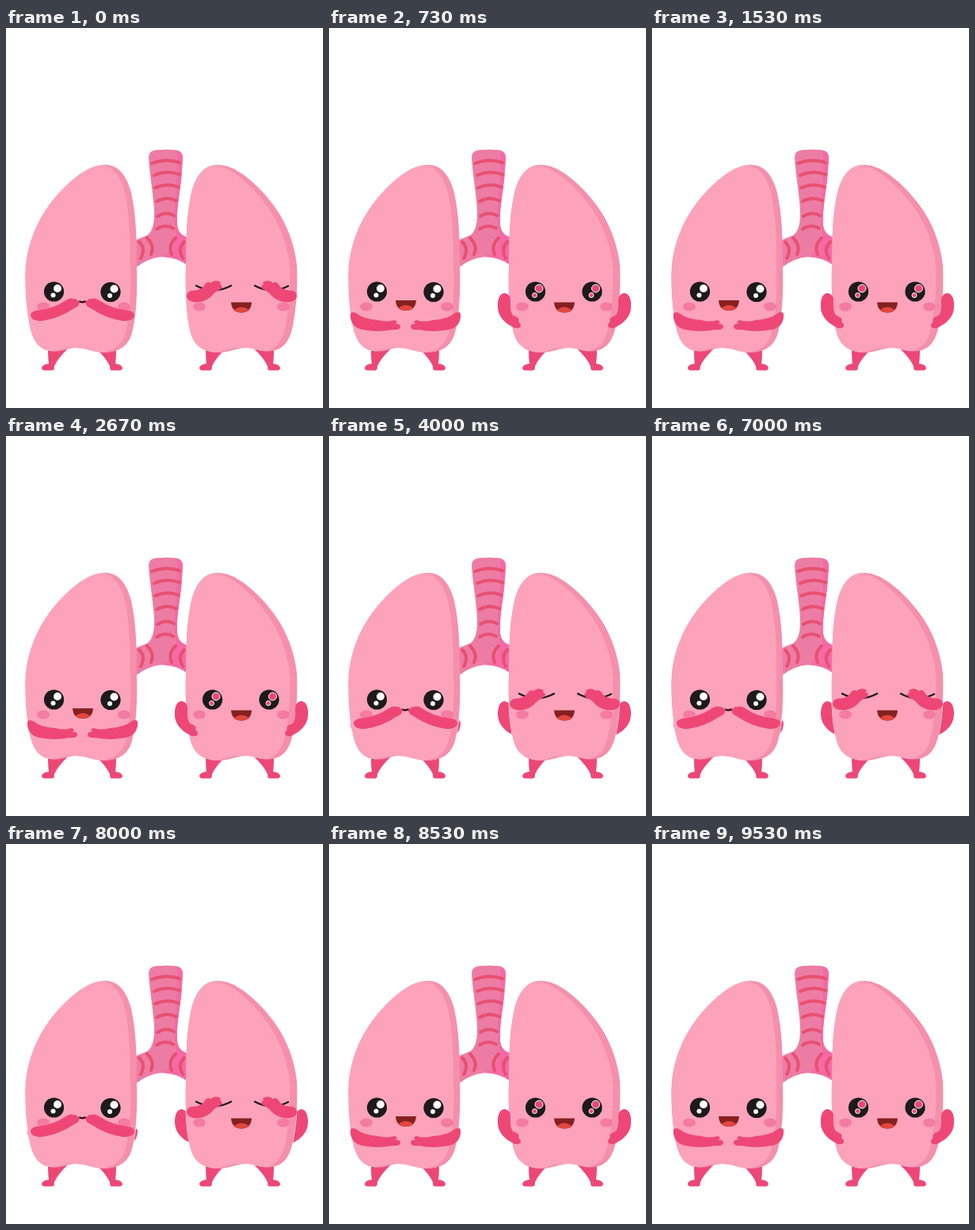
An HTML page for the animation above (9.99 s loop, 400x480 px).

```html
<!DOCTYPE html>
<html lang="en">
<head>
<meta charset="utf-8">
<title>Happy lungs</title>
<style>
html, body { margin: 0; width: 100%; height: 100%; overflow: hidden; background: #fff; }
svg { display: block; width: 400px; height: 480px; }
.arm { fill: #ee4776; }
.leg { fill: #ed4778; }
.cheek { fill: #f47ba2; }
.shade { fill: #f58fab; }
.skin { fill: #fca3bb; }
.ring { fill: none; stroke: #e85070; stroke-width: 4; stroke-linecap: round; }
.lash { fill: none; stroke: #211b1d; stroke-width: 2.5; stroke-linecap: round; }
</style>
</head>
<body>
<svg viewBox="0 0 400 480">
  <defs>
    <path id="lung" d="M122 173C140 171 152 185 158 208C164 235 165 265 165 300C166 340 164 365 159 385C154 403 141 410 122 410C109 409 101 404 88 404C78 404 74 408.5 62 408.5C42 408 33 396 29 370C25 347 24 325 25 300C28 272 38 246 55 223C73 199 100 174 122 173Z"/>
    <clipPath id="lungClip"><use href="#lung"/></clipPath>
    <path id="leg" class="leg" d="M53 404Q53 418 54 424Q45 425 45 430Q46 433 51 432.5H59Q61 432 61 427Q65 418 77 406Z"/>
    <g id="legs"><use href="#leg"/><use href="#leg" transform="matrix(-1 0 0 1 192 0)"/></g>
    <path id="tube" d="M180 163Q180 155 190 154Q203 153 213 154Q223 155 223 164Q222 190 218 215Q214 244 217 254Q220 262 230 265V300Q214 289 197 289Q180 290 163 303V268L178 262Q187 256 187 235C187 215 181 185 180 163Z"/>
    <clipPath id="tubeClip"><use href="#tube"/></clipPath>
    <path id="hug" class="arm" d="M27 362Q28 357 34 360Q44 368 62 369Q74 372 82 369Q88 370 84 374Q90 373 90 378Q88 382 80 381Q62 385 42 381Q27 378 27 362Z"/>
    <path id="hip" class="arm" d="M213 349Q214 335 222 335Q230 337 229 346Q228 357 232 363Q242 366 239 371Q244 375 241 378Q236 381 231 377Q212 367 213 349Z"/>
    <path id="hush" class="arm" d="M31 362Q32 357 44 356Q60 354 74 345Q81 340 85 342Q90 342 90 344Q95 346 92 349Q91 352 86 354Q67 367 45 370Q31 370 31 362Z"/>
    <path id="hide" class="arm" d="M228 339Q228 331 238 331.5Q247 331 251 324Q254 319 258 322Q263 318 268 320Q272 320 270 324Q275 325 271 330Q265 332 258 340Q250 346 240 346.5Q229 346 228 339Z"/>
    <g id="openArms">
      <use href="#hug"/><use href="#hug" transform="matrix(-1 0 0 1 193 0)"/>
      <use href="#hip"/><use href="#hip" transform="matrix(-1 0 0 1 594 0)"/>
    </g>
    <g id="mouth">
      <path d="M0 0H26Q25 13 13 13Q1 13 0 0Z" fill="#85201f"/>
      <path d="M4 9.5Q8 6 13 6Q18 6 22 9.5Q19 13 13 13Q7 13 4 9.5Z" fill="#e2463f"/>
    </g>
  </defs>

  <g id="trail"><use href="#openArms"/></g>
  <g fill="none" stroke="#fff"><use href="#lung"/><use href="#lung" transform="matrix(-1 0 0 1 392 0)"/></g>
  <use href="#legs"/><use href="#legs" x="199"/>
  <use href="#tube" fill="#ed7ca4"/>
  <path clip-path="url(#tubeClip)" fill="#f56aa6" d="M215 150H235V310Q216 292 190 292Q214 284 215 262Q211 240 214 205Q218 180 215 150Z"/>
  <g id="rings" class="ring">
    <path d="M168 270Q177 279 170 291M178 265Q188 275 183 286M214 265Q204 275 209 286M225 270Q216 279 223 291"/>
  </g>
  <use href="#lung" class="shade"/>
  <g clip-path="url(#lungClip)" class="skin"><use href="#lung" x="-8"/><path d="M20 250H60V420H20Z"/></g>
  <g transform="matrix(-1 0 0 1 392 0)">
    <use href="#lung" class="shade"/>
    <g clip-path="url(#lungClip)" class="skin"><use href="#lung" x="9"/></g>
  </g>
  <g class="cheek">
    <ellipse cx="47" cy="352" rx="8" ry="5.5"/><ellipse cx="149" cy="352" rx="8" ry="5.5"/>
    <ellipse cx="244" cy="352" rx="8" ry="5.5"/><ellipse cx="350" cy="352" rx="8" ry="5.5"/>
  </g>
  <g id="leftEyes"></g>
  <use href="#mouth" x="284" y="346.5"/>

  <g id="shy">
    <path class="lash" d="M93 345.5Q96 347 100 345.5"/>
    <use href="#hush"/><use href="#hush" transform="matrix(-1 0 0 1 193 0)"/>
    <path class="lash" d="M240 325.5Q262 337 284 325.5M314 325.5Q335 337 356 326"/>
    <use href="#hide"/><use href="#hide" transform="matrix(-1 0 0 1 595 0)"/>
  </g>
  <g id="open">
    <g id="rightEyes"></g>
    <use href="#mouth" x="84" y="344"/>
    <use href="#openArms"/>
  </g>
</svg>
<script>
const LOOP = 9990;
const $ = id => document.getElementById(id);

const WHITE = 'fill="#fff"';
const PINK = 'fill="#ee4776" stroke="#fff" stroke-width="1"';
const dot = (x, y, r, paint) => `<circle cx="${x}" cy="${y}" r="${r}" ${paint}/>`;
const eye = (x, y, glint) =>
  dot(x, y, 12.6, 'fill="#1d1a1b"') +
  dot(x + 4.5, y - 4, 5, glint) + dot(x - 1, y + 4.5, 3, glint);

$('leftEyes').innerHTML = eye(60.5, 333, WHITE) + eye(132, 333.5, WHITE);
$('rightEyes').innerHTML = eye(260.5, 333, PINK) + eye(332, 333, PINK);

// Trachea rings: left end, right end, height.
const rings = [[184, 219, 169], [187, 219, 184], [188, 218, 200],
               [190, 215, 217], [191, 212, 236], [190, 211, 252]];
$('rings').innerHTML += rings.map(([a, b, y]) =>
  `<path d="M${a} ${y + 2}Q${(a + b) / 2} ${y - 5} ${b} ${y + 1}"/>`).join('');

const show = (id, on) => $(id).style.display = on ? '' : 'none';

function draw(now) {
  const t = now % LOOP;
  const open = t % 1000 >= 530;
  show('open', open);
  show('shy', !open);
  show('trail', t >= 530);   // arms stay behind the lungs once they have opened
}

const start = performance.now();
function tick() {
  draw(performance.now() - start);
  requestAnimationFrame(tick);
}
tick();
</script>
</body>
</html>
```
